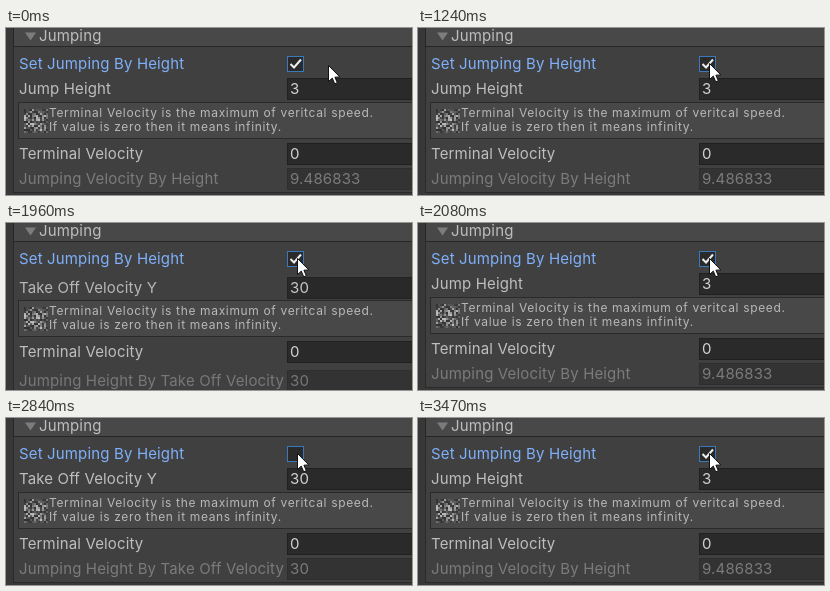
An HTML page with a canvas for the animation above (4.61 s loop, 406 by 167 pixels).

```html
<!DOCTYPE html>
<html>
<head>
<meta charset="utf-8">
<style>
  html, body { margin: 0; width: 100%; height: 100%; overflow: hidden; background: #383838; }
  canvas { display: block; }
</style>
</head>
<body>
<canvas width="406" height="167"></canvas>
<script>
const ctx = document.querySelector('canvas').getContext('2d');
const LOOP = 4610, ROW = 24, GAP = 3;
const LABEL = '15px Inter, sans-serif', SMALL = '12px Inter, sans-serif';

// Each click: press, release, start and end of the field swap, resulting state
const clicks = [
  { down: 1010, up: 1240, start: 1340, end: 1430, on: 0 },
  { down: 1830, up: 1930, start: 1960, end: 2080, on: 1 },
  { down: 2610, up: 2710, start: 2710, end: 2840, on: 0 },
  { down: 3280, up: 3350, start: 3350, end: 3470, on: 1 }
];

function box(x, y, w, h, fill, stroke) {
  ctx.fillStyle = stroke;
  ctx.fillRect(x, y, w, h);
  ctx.fillStyle = fill;
  ctx.fillRect(x + 1, y + 1, w - 2, h - 2);
}

function text(str, x, y, color, font = LABEL, spacing = 0.15) {
  ctx.font = font;
  ctx.letterSpacing = spacing + 'px';
  ctx.fillStyle = color;
  ctx.fillText(str, x, y);
}

function polygon(points, x = 0, y = 0) {
  ctx.beginPath();
  points.forEach(([px, py]) => ctx.lineTo(x + px, y + py));
}

function row(label, value, y, disabled) {
  const color = disabled ? '#7b7b7b' : '#bebebe';
  text(label, 13, y + 16, color);
  box(281, y, 130, 22, disabled ? '#333' : '#2a2a2a', disabled ? '#2e2e2e' : '#202020');
  text(value, 284, y + 16, disabled ? color : '#d2d2d2');
}

// Two rows sharing one slot: the first fades in as the second fades out
function swapRows(first, second, y, shown, disabled) {
  const moving = shown > 0 && shown < 1;
  const split = Math.round(shown * ROW);
  const parts = [
    [first, y, split, shown],
    [second, y + split + (moving ? GAP : 0), ROW - split, 1 - shown]
  ];
  for (const [[label, value], top, height, alpha] of parts) {
    if (!alpha) continue;
    ctx.save();
    ctx.beginPath();
    ctx.rect(0, top, 406, height);
    ctx.clip();
    ctx.globalAlpha = alpha;
    row(label, value, top, disabled);
    ctx.restore();
  }
  return moving ? GAP : 0;
}

function icon(x, y) {
  let seed = 11;
  for (let i = 0; i < 144; i++) {
    seed = (seed * 16807) % 2147483647;
    const r = seed / 2147483647;
    const v = Math.round(50 + 140 * r * r);
    ctx.fillStyle = `rgb(${v},${v},${v})`;
    ctx.fillRect(x + (i % 12) * 2, y + Math.floor(i / 12) * 2, 2, 2);
  }
}

function helpBox(y) {
  box(12, y, 400, 37, '#484848', '#2a2a2a');
  icon(18, y + 7);
  text('Terminal Velocity is the maximum of veritcal speed.', 43, y + 15, '#b8b8b8', SMALL, 0.65);
  text('If value is zero then it means infinity.', 43, y + 29, '#b8b8b8', SMALL, 0.65);
}

function header() {
  box(7, -1, 400, 20, '#484848', '#262626');
  ctx.fillStyle = '#7c7c7c';
  polygon([[19, 4.5], [30, 4.5], [24.5, 12.5]]);
  ctx.fill();
  text('Jumping', 33, 13, '#bebebe');
}

function checkbox(checked) {
  text('Set Jumping By Height', 13, 41, '#7fb0fa');
  box(281, 28, 17, 16, '#2a2a2a', '#3a79bb');
  if (!checked) return;
  polygon([[284.5, 36], [288, 39.5], [295, 31.5]]);
  ctx.strokeStyle = '#eee';
  ctx.lineWidth = 2;
  ctx.stroke();
}

function cursor(t) {
  const p = Math.min(1, Math.max(0, (t - 120) / 380));
  const e = p * p * (3 - 2 * p);
  const x = t < 840 ? 322.5 - 28 * e : 291.5;
  const y = 37.5 - 2 * e;
  polygon([[0, 0], [0, 16], [3.8, 12.6], [6.2, 18.3], [8.8, 17.2], [6.4, 11.7], [11.3, 11.4]], x, y);
  ctx.closePath();
  ctx.fillStyle = '#fff';
  ctx.fill();
  ctx.strokeStyle = '#111';
  ctx.lineWidth = 1;
  ctx.stroke();
}

function stateAt(t) {
  let checked = 1, shown = 1, pressed = false;
  for (const c of clicks) {
    if (t >= c.down && t < c.up) pressed = true;
    if (t < c.start) break;
    checked = c.on;
    const step = Math.floor((t - c.start) / 30) * 30 + 5;
    const p = t >= c.end ? 1 : Math.min(0.97, step / (c.end - c.start + 5));
    const eased = 1 - (1 - p) ** 1.5;
    shown = c.on ? eased : 1 - eased;
  }
  return { checked, shown, pressed };
}

function draw(now) {
  const t = now % LOOP;
  const { checked, shown, pressed } = stateAt(t);
  const shift = shown > 0 && shown < 1 ? GAP : 0;
  ctx.fillStyle = '#383838';
  ctx.fillRect(0, 0, 406, 167);
  box(7, -1, 400, 166 + 2 * shift, '#404040', '#2a2a2a');
  header();
  checkbox(checked);

  swapRows(['Jump Height', '3'], ['Take Off Velocity Y', '30'], 50, shown);
  helpBox(74 + shift);
  row('Terminal Velocity', '0', 115 + shift);
  swapRows(['Jumping Velocity By Height', '9.486833'],
    ['Jumping Height By Take Off Velocity', '30'], 140 + shift, shown, true);

  if (pressed) {
    ctx.fillStyle = 'rgba(240,225,20,0.7)';
    ctx.beginPath();
    ctx.arc(291, 35.5, 12.2, 0, 7);
    ctx.fill();
  }
  cursor(t);
  requestAnimationFrame(draw);
}

draw(performance.now());
</script>
</body>
</html>
```
